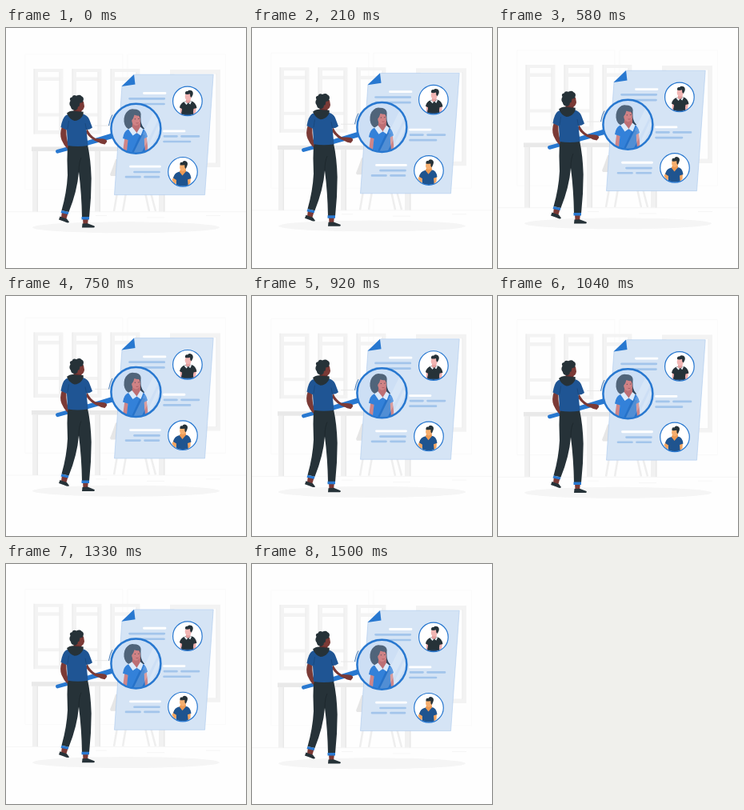
Animation, 300 px wide and 300 px high, one loop 1540 ms. Source, as an HTML page:

```html
<!DOCTYPE html>
<html lang="en">
<head>
<meta charset="utf-8">
<title>Choosing a candidate</title>
<style>
html, body { margin: 0; width: 100%; height: 100%; overflow: hidden; background: #fefefe; }
svg { display: block; width: 100vw; height: 100vh; }
</style>
</head>
<body>
<svg viewBox="0 0 300 300">
  <defs>
    <clipPath id="lensClip"><circle cx="162.400" cy="125.700" r="30.500"/></clipPath>
    <clipPath id="topClip"><circle cx="226.900" cy="91.400" r="18"/></clipPath>
    <clipPath id="lowClip"><circle cx="221" cy="179.800" r="18"/></clipPath>
    <g id="window">
      <path fill="#f3f3f3" fill-rule="evenodd" d="M0 0H37V81.500H0ZM5.500 4H32V10.500H5.500ZM5.500 15H32V55.500H5.500ZM5.500 59.500H32V77H5.500Z"/>
      <path fill="#ededed" d="M0 0H1.500V81.500H0ZM32 4H33V77H32Z"/>
    </g>
  </defs>
  <g id="scene">
    <!-- room -->
    <path d="M24 33H146V202H24ZM152 33H274.500V202H152Z" fill="none" stroke="#f8f8f8" stroke-width=".7"/>
    <path d="M0 229.700H300M250 234.500H268M176 237H198M112 234.500H126" fill="none" stroke="#f3f3f3" stroke-width=".7"/>
    <use href="#window" x="34.500" y="51"/>
    <use href="#window" x="82.500" y="51"/>
    <use href="#window" x="130.500" y="51"/>
    <path fill="#f3f3f3" fill-rule="evenodd" d="M205 52H268V174H205ZM210.500 57.500V168.500H262.500V57.500Z"/>
    <path d="M263 57V169" stroke="#ebebeb" stroke-width=".8"/>
    <path fill="#f1f1f1" d="M33 154H40V229.500H33ZM111 154H118V229.500H111ZM191 154H198.500V229.500H191Z"/>
    <path fill="#e9e9e9" d="M32 148.500H199V154H32ZM38.500 154H40V229.500H38.500ZM116.500 154H118V229.500H116.500ZM197 154H198.500V229.500H197Z"/>
    <path fill="#e6e6e6" d="M137 164Q133 176 130 183L131 185H140V164Z"/>
    <path d="M140 200L135 229M150 206L146 229M174 206L179 229M181 206L187 229" fill="none" stroke="#eeeeee" stroke-width="2.500"/>
    <path d="M111 122H130" stroke="#e8e8e8"/>
    <ellipse cx="150" cy="249.300" rx="117" ry="7" fill="#f5f5f5"/>

    <!-- sheet -->
    <path d="M161 58.200H259.200L248.500 208.600H135.500L145 72.500Z" fill="#d5e4f5" stroke="#a9c8ec" stroke-width=".6"/>
    <path d="M160 58L144.500 73L161.500 70.500Z" fill="#2878d0"/>
    <path d="M172.500 81.500H199M197.500 128.900H223M155.500 173.200H192.500" fill="none" stroke="#fff" stroke-width="2.800" stroke-linecap="round"/>
    <path d="M154.500 88.300H197.800M154.500 95H197.500M198 135.400H213.500M219.500 135.400H241M197.500 142H230M160.500 180H191.500M150 186.200H167.500M173.500 186.200H191" fill="none" stroke="#a3c5eb" stroke-width="2.700" stroke-linecap="round"/>

    <!-- upper portrait -->
    <circle cx="226.900" cy="91.400" r="18.300" fill="#fff"/>
    <g clip-path="url(#topClip)">
      <path d="M218 97L217.500 112H222L222 98ZM234 97V112L237 108L238 97Z" fill="#f0b0ae"/>
      <path d="M219.500 104.500H234L235 112H218.500Z" fill="#23456c"/>
      <path d="M223.500 92Q227 90.500 232 91.500Q237 92.500 238.500 100L234.500 101L233.500 107.500H219.500L220 101L217 99.500Q218 93.500 223.500 92Z" fill="#263238"/>
      <path d="M225.500 88L224.500 92.500Q227.500 96 230.500 91.500V87Z" fill="#e59f9e"/>
      <path d="M224 91.800L227 94.500L225.500 96L222.800 93ZM230.800 91.200L228.500 94.500L230.500 95.500L232 92Z" fill="#eef3f7"/>
      <ellipse cx="227.700" cy="85.800" rx="4" ry="5" fill="#f1b5b3"/>
      <path d="M224 82.500Q223.500 78.300 227 79Q229 76.800 232 78.300Q234.500 80 233.500 83.500L231.800 87L230.300 85.500L230 82.300Q226.500 83.500 224 82.500Z" fill="#263238"/>
    </g>
    <circle cx="226.900" cy="91.400" r="18.300" fill="none" stroke="#2878d0" stroke-width="1.200"/>

    <!-- lower portrait -->
    <circle cx="221" cy="179.800" r="18.300" fill="#fff"/>
    <g clip-path="url(#lowClip)">
      <path d="M210 185L207.500 190L212 197L214 187ZM227 186V197L230.500 194L231 185Z" fill="#f4a662"/>
      <path d="M217 179.500L224.500 179Q230.500 179.500 231.500 188L227 189.500L228 200H212.500L213 190L209 187.500Q210.500 180.500 217 179.500Z" fill="#1f548f"/>
      <path d="M218.500 176L216.800 179.800L220.500 184.500L225 179.300L224.500 175Z" fill="#ec9a54"/>
      <ellipse cx="220.900" cy="174" rx="3.800" ry="4.900" fill="#f6ae6d"/>
      <path d="M217.500 171.500Q217 167 220.300 168Q222 165 225 166.500Q228 168 226.500 172L224.800 176L223.500 174.500L223.300 171.300Q220 171.800 217.500 171.500Z" fill="#263238"/>
    </g>
    <circle cx="221" cy="179.800" r="18.300" fill="none" stroke="#2878d0" stroke-width="1.200"/>

    <!-- magnifier -->
    <path d="M133 108.500Q130 113 128.500 122" fill="none" stroke="#2d69ae" stroke-width=".9"/>
    <path d="M64.500 154.300L100 144.500" stroke="#2878d0" stroke-width="4.800" stroke-linecap="round"/>
    <path d="M98 142L131.500 131.800L133.500 138L99 147.500Z" fill="#2878d0"/>
    <circle cx="162.400" cy="125.700" r="31" fill="#cddff5"/>
    <g clip-path="url(#lensClip)">
      <path d="M152 104Q155 100.500 160 101.500Q167 101.500 168.500 106.500Q168.500 113 168.500 117Q169.500 122 173 126L168 127L163 122L155 127Q148.500 125 147.500 117Q147 108 152 104Z" fill="#50647a"/>
      <path d="M166.500 107Q168.500 112 168.300 117Q169.500 123 173 126L167.500 127L164 121Z" fill="#30455a"/>
      <path d="M148.500 136L145.500 158H151L153 138ZM172 136L173 158H178L175.800 135Z" fill="#cf8587"/>
      <path d="M152 127Q158 123.500 170 125.500Q175 127 177 136L172.500 138.500L174 158H150.500L152.500 140L146 138Q147.500 129 152 127Z" fill="#3381d9"/>
      <path d="M168 132L174 134L172.500 138.500L174 158H156Z" fill="#2672c9"/>
      <path d="M158.500 116L157.500 125L163.500 132L168 125V117Z" fill="#bd6f74"/>
      <path d="M157.500 123.500L163.500 131L158.500 134.500L153 126.500ZM168 123.500L163.500 131L168.500 134.500L171.500 126.500Z" fill="#dceafa"/>
      <ellipse cx="162.500" cy="114.800" rx="5.400" ry="7.300" fill="#d08285"/>
      <path d="M153 112Q154 104 161 104Q168 104 168.500 109Q164 110.500 160.500 108.500Q159.500 113 157 115.500Q156.500 121 155.500 125Q150 119 153 112Z" fill="#50647a"/>
      <path d="M160.800 113.800H161.800M165.300 113.500H166.300" stroke="#39414d" stroke-width="1"/>
      <path d="M162.500 118.700Q164 119.700 165.500 118.500" fill="none" stroke="#9e4f56" stroke-width=".7"/>
      <path d="M185 104L159 157H169L192 111ZM190 121L174 156H178L193 125Z" fill="#fff" opacity=".2"/>
    </g>
    <circle cx="162.400" cy="125.700" r="31" fill="none" stroke="#2878d0" stroke-width="2.500"/>

    <!-- standing man -->
    <path d="M70 229L69 237L75 240L78 230ZM96 237L96.500 246H102L103 237Z" fill="#7b3a36"/>
    <path d="M67.500 235.500Q71 237 76 238.500L79 242.500Q77.500 244.500 73 242L66 239.500ZM95.500 244.500L102 244.200L110.500 247.500Q112 249.500 108 249.500H95Z" fill="#263238"/>
    <path d="M77 146H102Q106 164 106.700 188Q106.700 212 104 237H95Q94.500 207 91 180Q89 204 78.500 230L69.500 228Q76 205 77 184Q76 164 77 146Z" fill="#263238"/>
    <path d="M91 180Q91 168 94 162" fill="none" stroke="#1b2429" stroke-width=".7"/>
    <path d="M69.500 228L78.500 230L77.500 233L68.500 231ZM94.500 236H104V239.500H94.500Z" fill="#2878d0"/>
    <path d="M70 123Q66.500 133 69.500 140Q72 146 76.500 151L78.500 146Q75 139 75.500 127Z" fill="#7b3a36"/>
    <path d="M101.500 126Q105 134 112 138L121 138.500Q127 139 126 142.500L123.500 145.500L119 144.500L116 143Q106 140 99.500 130Z" fill="#7b3a36"/>
    <path d="M75 109Q85 104 96 107.500Q102 109 104 114L108 124.500Q104 127.500 100.500 127L102.500 147Q90 149 77 147L76 127.500L68.500 124Q70.500 112 75 109Z" fill="#1f5594"/>
    <path d="M77 126L78.500 116M100.500 127L99 119" fill="none" stroke="#174474" stroke-width=".7"/>
    <path d="M84.500 99V108Q90 111 94.500 105V99Z" fill="#682f2d"/>
    <path d="M76 106.500Q79 103.500 84 103.500Q91 105 96.500 104.500Q97.500 108 94.500 111.500Q91 115.800 85.500 116Q79.500 114.500 76 106.500Z" fill="#263238"/>
    <path d="M87 92Q93 89 97 92L98 98Q97 104 92 103.500Q86 103 86 98Z" fill="#7b3a36"/>
    <path d="M80.500 91Q78.500 87 82.500 86.500Q84 82.800 88 84.800Q92 82.500 94.500 85.200Q98 87 96.500 91Q96 94 92.500 93.500L91.500 98Q89.500 97.500 89.500 101L86.500 103Q81 102 81 98.500Q78 95 80.500 91Z" fill="#263238"/>
  </g>
</svg>
<script>
const scene = document.getElementById("scene");
const LOOP = 1540, PEAK = 700, REST = 1500, RISE = 6;

function lift(t) {
  if (t < PEAK) return RISE * t / PEAK;
  return RISE * Math.max(0, (REST - t) / (REST - PEAK));
}

function draw(now) {
  const y = -lift(now % LOOP);
  scene.setAttribute("transform", `translate(0 ${y.toFixed(3)})`);
}

let start;
function tick(now) {
  start ??= now;
  draw(now - start);
  requestAnimationFrame(tick);
}
draw(0);
requestAnimationFrame(tick);
</script>
</body>
</html>
```
